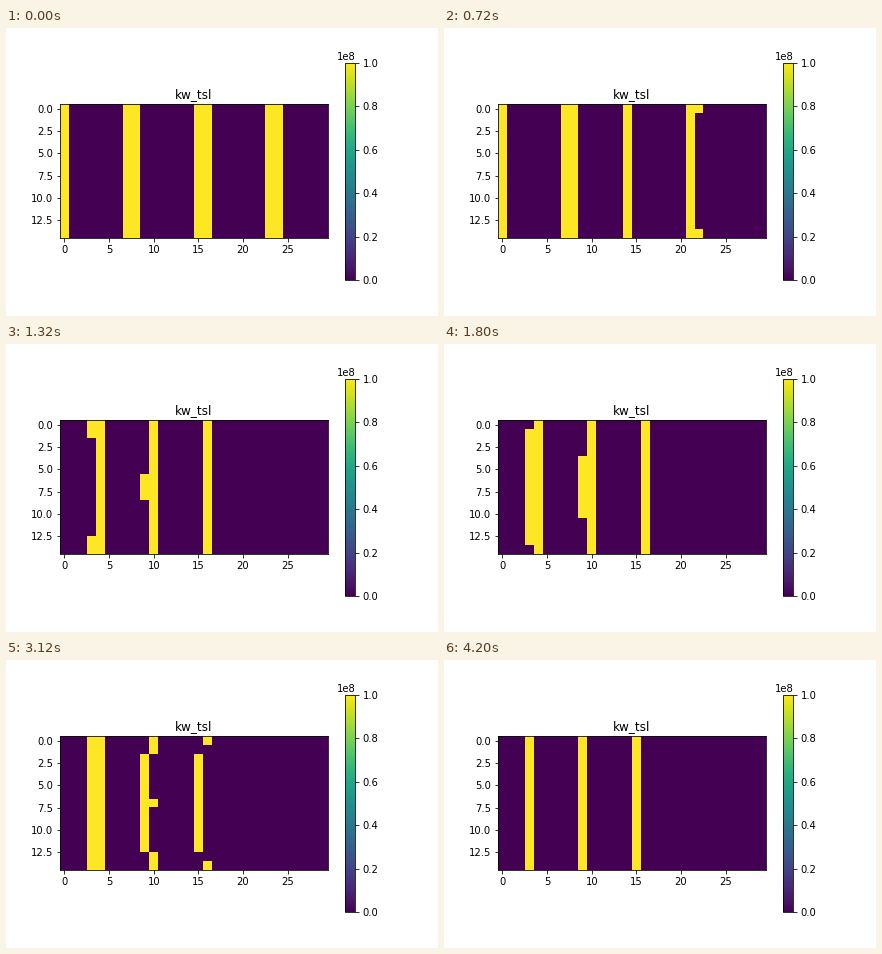
Write a matplotlib script that moves like this. It is 432 by 288 pixels and loops after 4.8 s.

```python
import numpy as np
import matplotlib.pyplot as plt
from matplotlib.animation import FuncAnimation

ROWS, COLS = 15, 30
STEP = 120
HIGH = 1e8

plt.rcParams.update({
    "font.family": "DejaVu Sans",
    "font.size": 10,
    "figure.subplot.bottom": 0.125,
})

# Distance of each row from the nearest edge, 0 at top and bottom
depth = np.minimum(np.arange(ROWS), np.arange(ROWS)[::-1])
FULL = depth >= 0


def mid(n):
    """Rows left after trimming n from both ends."""
    return depth >= n


def ends(n):
    """The n outermost rows at both ends."""
    return depth < n


def walls(*full, **parts):
    """Full columns plus partial ones given as c<column>=row mask."""
    cols = {c: FULL for c in full}
    cols.update({int(k[1:]): rows for k, rows in parts.items()})
    return cols


# (start time in ms, lit columns)
PHASES = [
    (0, walls(0, 7, 8, 15, 16, 23, 24)),
    (120, walls(0, 8, 15, 16, 23, 24, c7=mid(1))),
    (360, walls(0, 8, 15, 16, 23, c7=mid(2), c24=ends(4))),
    (480, walls(0, 8, 15, 16, 23, c7=mid(2), c24=ends(1))),
    (600, walls(0, 8, 15, 22, c7=mid(1), c23=ends(1))),
    (720, walls(0, 7, 8, 14, 21, c22=ends(1))),
    (1080, walls(0, 7, 14, 21)),
    (1320, walls(4, 10, 16, c3=ends(2), c9=mid(6))),
    (1680, walls(3, 4, 10, 16, c9=mid(5))),
    (1800, walls(4, 10, 16, c3=mid(1), c9=mid(4))),
    (2160, walls(3, 4, 10, c9=mid(3), c15=mid(1), c16=mid(1) & ends(3))),
    (2280, walls(3, 4, 10, c9=mid(2), c15=mid(1), c16=mid(1) & ends(2))),
    (2640, walls(3, 4, c9=mid(2), c10=ends(4) | mid(6),
                 c15=mid(2), c16=ends(2))),
    (3120, walls(3, 4, c9=mid(2), c10=ends(2) | mid(7),
                 c15=mid(2), c16=ends(1))),
    (3240, walls(3, c4=ends(5), c9=mid(1), c10=ends(1),
                 c15=mid(1), c16=ends(1))),
    (3480, walls(3, 9, c4=ends(3), c10=ends(1), c15=mid(1), c16=ends(1))),
    (3600, walls(3, 9, 15, c4=ends(1), c10=ends(1), c16=ends(1))),
    (3720, walls(3, 9, 15, c10=ends(1), c16=ends(1))),
    (4200, walls(3, 9, 15)),
]


def field(ms):
    cols = [lit for start, lit in PHASES if start <= ms][-1]
    grid = np.zeros((ROWS, COLS))
    for col, rows in cols.items():
        grid[rows, col] = HIGH
    return grid


fig, ax = plt.subplots(figsize=(6, 4), dpi=72, facecolor="white")
image = ax.imshow(field(0), cmap="viridis", vmin=0, vmax=HIGH,
                  interpolation="nearest")
ax.set_title("kw_tsl")
ax.set_xticks(np.arange(0, 30, 5))
ax.set_yticks(np.arange(0, 15, 2.5))
bar = fig.colorbar(image, ax=ax)
bar.set_ticks(np.arange(0, 11, 2) * 1e7)
bar.ax.yaxis.set_offset_position("right")


def update(i):
    image.set_data(field(i * STEP))
    return [image]


anim = FuncAnimation(fig, update, frames=40, interval=STEP,
                     init_func=lambda: update(0), repeat=True,
                     repeat_delay=0, blit=False)
plt.show()
```
